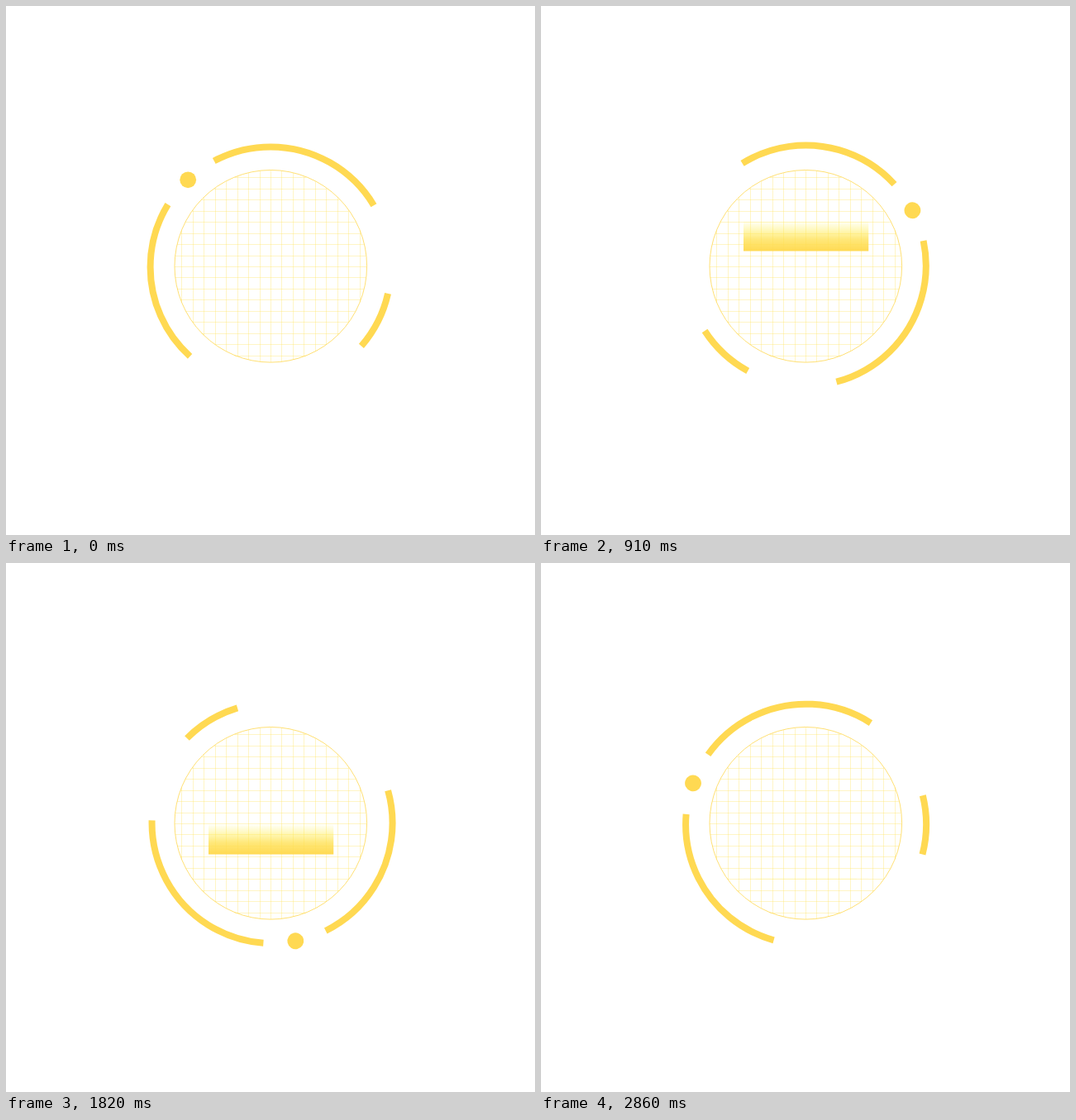
Recreate the animation shown at these times as an HTML page. Size 640 by 640 pixels, loop 2.99 s.

```html
<!DOCTYPE html>
<html lang="en">
<head>
<meta charset="utf-8">
<title>Scanner</title>
<style>
  html, body { margin: 0; height: 100%; overflow: hidden; background: #fff; }
  svg { display: block; width: 100vw; height: 100vh; }
</style>
</head>
<body>
<svg viewBox="0 0 640 640" fill="none" stroke="#ffd952">
  <defs>
    <linearGradient id="fade" x1="0" y1="0" x2="0" y2="1">
      <stop offset="0" stop-color="#fff25a" stop-opacity=".06"/>
      <stop offset=".3" stop-color="#ffec50" stop-opacity=".4"/>
      <stop offset=".6" stop-color="#ffe04e" stop-opacity=".75"/>
      <stop offset="1" stop-color="#ffd952"/>
    </linearGradient>
    <clipPath id="window">
      <path d="M245 246H396.5V381.5H382V383H259.5V381.5H245Z"/>
    </clipPath>
  </defs>
  <path id="grid" stroke="#ffe566" stroke-opacity=".38"/>
  <circle cx="320.3" cy="314.8" r="116.3" stroke-opacity=".8"/>
  <g clip-path="url(#window)">
    <rect id="bar" x="245" width="151.5" height="36" fill="url(#fade)" stroke="none"/>
  </g>
  <g id="ring">
    <circle cx="320.1" cy="315.9" r="145.5" stroke-width="8" pathLength="360"
      stroke-dasharray="28.3 91.1 79.3 30.6 87.1 43.6" stroke-dashoffset="-12.7"/>
    <circle cx="220.2" cy="210.3" r="9.9" fill="#ffd952" stroke="none"/>
  </g>
</svg>
<script>
  const STEP = 130, STEPS = 23;
  const CX = 320, CY = 315, RADIUS = 116, CELL = 13.45;
  const [grid, bar, ring] = ['grid', 'bar', 'ring'].map(id => document.getElementById(id));

  let lines = '';
  for (let i = -8; i <= 8; i++) {
    const d = i * CELL, half = Math.sqrt(RADIUS ** 2 - d ** 2);
    const x = Math.round(CX + d) + .5, y = Math.round(CY + d) + .5;
    lines += `M${x} ${CY - half}v${2 * half}M${CX - half} ${y}h${2 * half}`;
  }
  grid.setAttribute('d', lines);

  const start = performance.now();

  function draw(now) {
    const n = Math.floor(Math.max(0, now - start) / STEP) % STEPS;
    ring.setAttribute('transform', `rotate(${n * 15.157} 320.9 315)`);
    bar.setAttribute('y', 204.5 + n * 8);
    requestAnimationFrame(draw);
  }
  draw(start);
</script>
</body>
</html>
```
